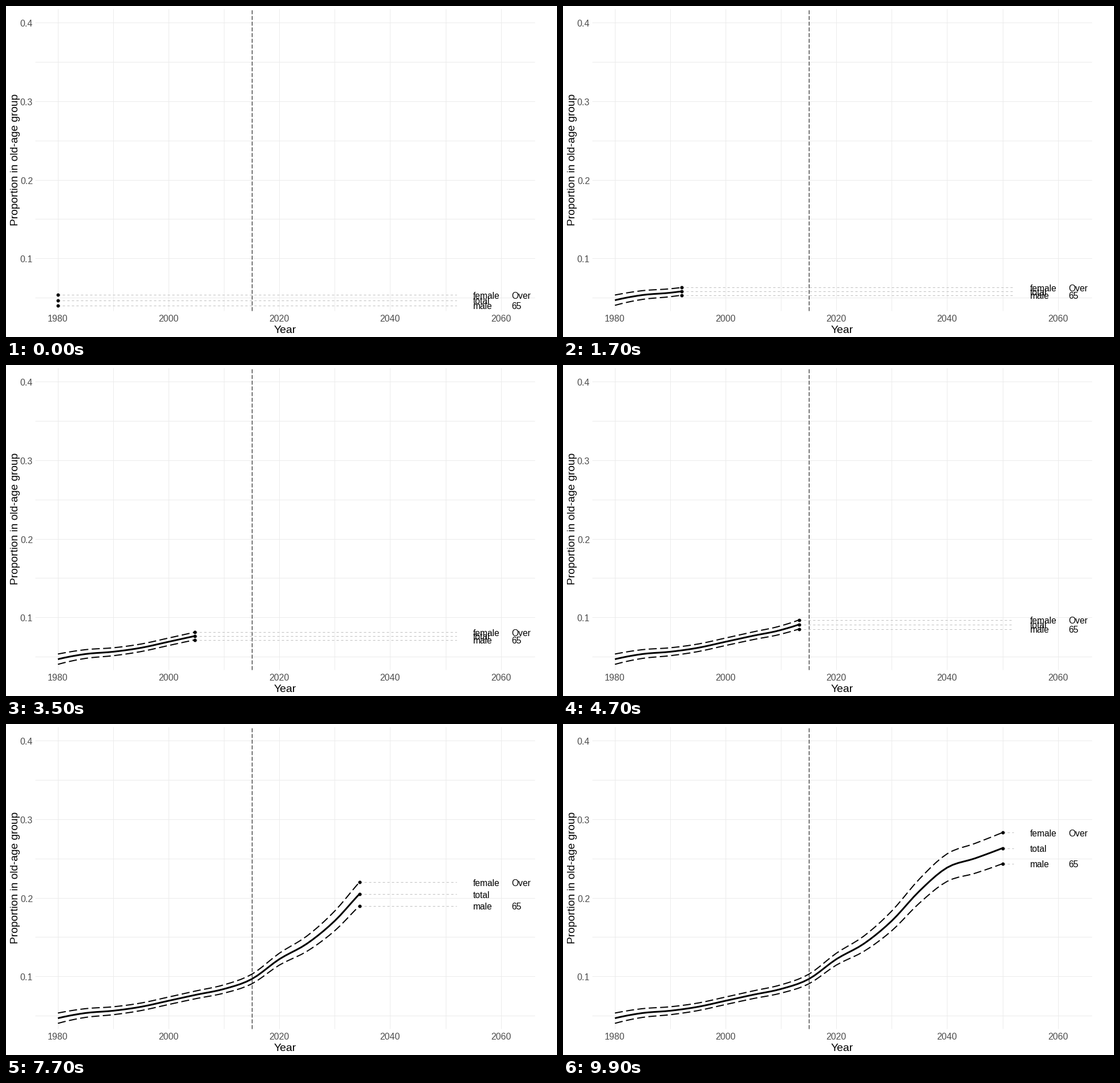
Animation of 966 by 580 pixels, one loop 10000 ms. Source, as a matplotlib script:

```python
import numpy as np
import matplotlib.pyplot as plt
from matplotlib.animation import FuncAnimation

W, H, DPI = 966, 580, 100
FRAMES, INTERVAL = 100, 100
PX = 72 / DPI  # points per pixel
START, END = 1980, 2050
LONG, SHORT = (0, (7, 3)), (0, (4, 4))
GRID, TICK, GUIDE = "#EBEBEB", "#4D4D4D", "#BEBEBE"

plt.rcParams["font.family"] = "Liberation Sans"

# Percentage over 65, every five years
KEYS = [4.71, 5.37, 5.66, 6.16, 6.93, 7.70, 8.43, 9.69,
        12.23, 14.21, 17.10, 20.90, 23.88, 25.05, 26.36]


def px(year):
    return 91 + 9.7075 * (year - START)


def py(share):
    return 442.7 - 1376.5 * (share - 0.1)


def smooth(x, xs, ys):
    """Cubic Hermite curve through the points."""
    m = np.gradient(ys, xs, edge_order=2)
    i = np.clip(np.searchsorted(xs, x, side="right") - 1, 0, len(xs) - 2)
    h = xs[i + 1] - xs[i]
    t = (x - xs[i]) / h
    ease = t * t * (3 - 2 * t)
    bend = h * t * (1 - t) * ((1 - t) * m[i] - t * m[i + 1])
    return ys[i] + (ys[i + 1] - ys[i]) * ease + bend


years = np.arange(START, END + 1)
total = smooth(years, np.arange(START, END + 1, 5), np.array(KEYS)) / 100
# The gap between the sexes narrows at first, then widens along an S-curve
gap = (0.436 + 0.218 * np.exp((START - years) / 8)
       + 1.635 / (1 + np.exp((2030 - years) / 7))) / 100

fig = plt.figure(figsize=(W / DPI, H / DPI), dpi=DPI, facecolor="white")
ax = fig.add_axes([0, 0, 1, 1])
ax.set_xlim(0, W)
ax.set_ylim(H, 0)
ax.axis("off")


def line(xs, ys, width, color="black", dash="-", z=2):
    return ax.plot(xs, ys, color=color, lw=width * PX, ls=dash, zorder=z,
                   solid_capstyle="butt", dash_capstyle="butt")[0]


def text(x, y, s, size, color="black", **kw):
    return ax.text(x, y, s, fontsize=size * PX, color=color, va="baseline",
                   zorder=6, **kw)


# Panel; whole coordinates snap to single pixel rows and columns
for year in range(1980, 2061, 10):
    x = round(px(year))
    line([x, x], [5, 534], 1, GRID, z=1)
    if year % 20 == 0:
        text(px(year), 553, str(year), 16, TICK, ha="center")
for step in range(1, 9):
    y = int(py(step * 0.05))
    line([51, 927], [y, y], 1, GRID, z=1)
    if step % 2 == 0:
        text(47, y + 7, f"{step * 0.05:.1f}", 16, TICK, ha="right")
text(489, 573, "Year", 19.4, ha="center")
text(21, 269, "Proportion in old-age group", 19.2, ha="center",
     rotation=90, rotation_mode="anchor")
x = round(px(2015))
line([x, x], [534, 5], 1, dash=LONG)


class Series:
    def __init__(self, shares, name, width, dash, note=""):
        self.ys = py(shares)
        self.curve = line([], [], width, dash=dash, z=3)
        self.guide = line([], [], 1, GUIDE, SHORT, z=4)
        self.dot = ax.plot([], [], "o", color="black", ms=6 * PX, mew=0,
                           zorder=5)[0]
        self.labels = [text(px(2055), 0, name, 15.65),
                       text(px(2062) - 0.5, 0, note, 15.65)]

    def show(self, now):
        past = years < now
        y = np.interp(now, years, self.ys)
        self.curve.set_data(px(np.append(years[past], now)),
                            np.append(self.ys[past], y))
        self.guide.set_data([px(now), px(2052)], [round(y)] * 2)
        self.dot.set_data([px(now)], [y])
        for label in self.labels:
            label.set_y(round(y + 6.5))


series = [Series(total + gap, "female", 2, LONG, "Over"),
          Series(total, "total", 3, "-"),
          Series(total - gap, "male", 2, LONG, "65")]


def update(i):
    now = START + (END - START) * i / (FRAMES - 1)
    for s in series:
        s.show(now)
    return []


anim = FuncAnimation(fig, update, frames=FRAMES, interval=INTERVAL,
                     init_func=lambda: update(0), repeat=True, repeat_delay=0)
plt.show()
```
